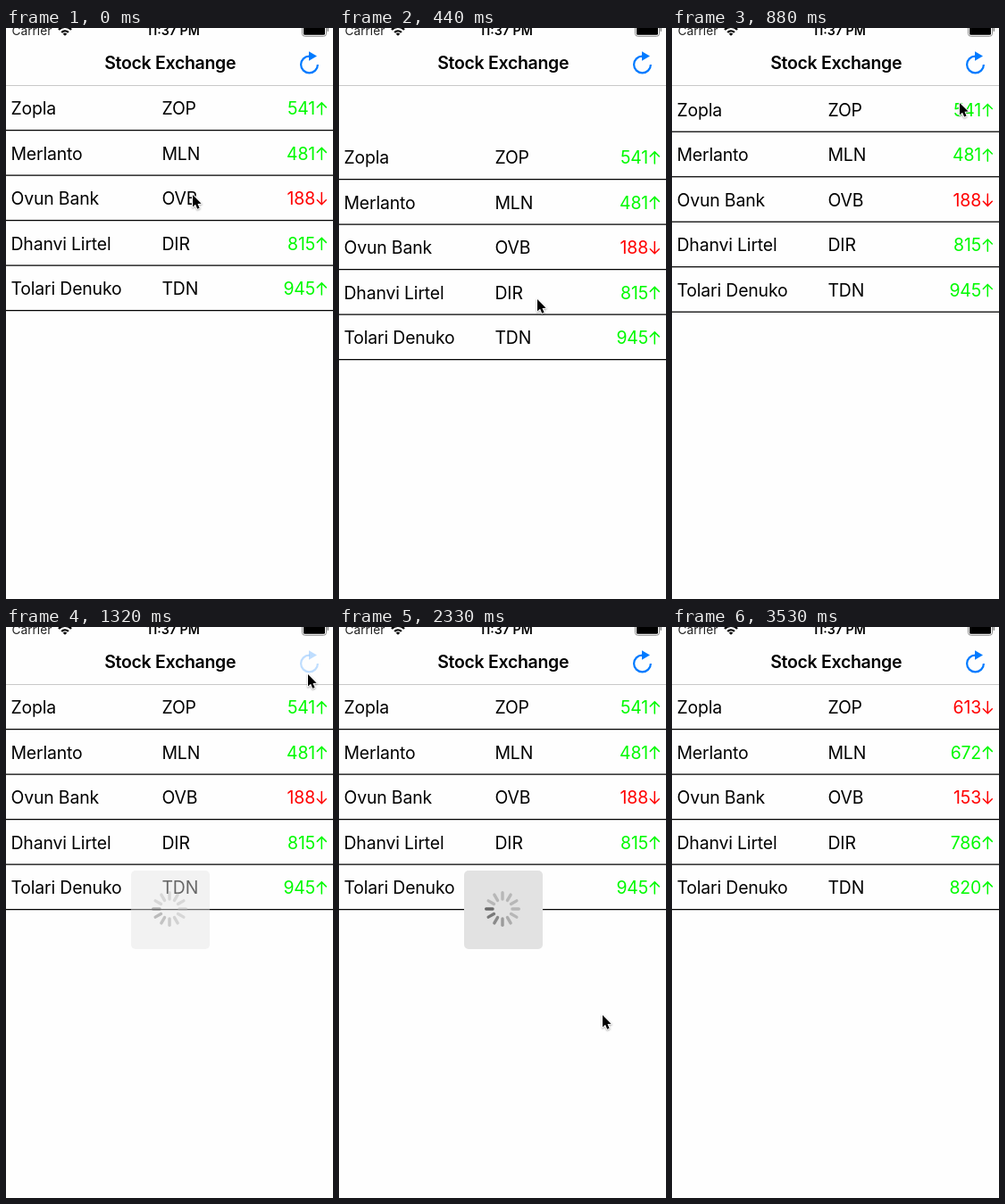
An HTML page with a canvas for the animation above (3.63 s loop, 366 by 640 pixels).

```html
<!DOCTYPE html>
<html lang="en">
<head>
<meta charset="utf-8">
<title>Stock Exchange</title>
<style>
  html, body { margin: 0; width: 100%; height: 100%; overflow: hidden; background: #fefefe; }
  canvas { display: block; width: 366px; height: 640px; }
</style>
</head>
<body>
<canvas id="stage" width="366" height="640"></canvas>
<script>
const ctx = document.getElementById('stage').getContext('2d');
const LOOP = 3630;
const PULL = 139, RELEASE = 433, TAP = 1300, RELOAD = 2480;
const GREEN = '#00fa00', RED = '#ff0000', BLUE = '#007aff';

// Negative values are falling prices.
const stocks = [
  { name: 'Zopla', code: 'ZOP', prices: [541, -613] },
  { name: 'Merlanto', code: 'MLN', prices: [481, 672] },
  { name: 'Ovun Bank', code: 'OVB', prices: [-188, -153] },
  { name: 'Dhanvi Lirtel', code: 'DIR', prices: [815, 786] },
  { name: 'Tolari Denuko', code: 'TDN', prices: [945, 820] }
];

// Pointer moves, each easing out with its own power.
const pointerStart = { x: 209, y: 187 };
const moves = [
  { from: 130, to: 330, x: 222, y: 304, power: 2 },
  { from: 433, to: 1168, x: 341, y: 42, power: 2 },
  { from: 1168, to: 1315, x: 338, y: 53, power: 1 },
  { from: 1580, to: 2180, x: 295, y: 435, power: 4 },
  { from: 2780, to: 3380, x: 331, y: 638, power: 1.5 },
  { from: 3380, to: 3530, x: 337, y: 662, power: 1 }
];

const clamp = v => Math.min(1, Math.max(0, v));

// The screen refreshes about seven times a second and catches up once midway.
function sampled(time) {
  const [origin, step] = time < 1580 ? [-8, 147] : [1580, 150];
  return origin + Math.floor((time - origin) / step) * step;
}

function pointerAt(time) {
  return moves.reduce((p, { from, to, x, y, power }) => {
    const k = 1 - (1 - clamp((time - from) / (to - from))) ** power;
    return { x: p.x + (x - p.x) * k, y: p.y + (y - p.y) * k };
  }, pointerStart);
}

function pullAt(time) {
  if (time < RELEASE) return 55 * clamp((time - PULL) / (RELEASE - PULL)) ** 0.8;
  const rest = 55 * Math.exp((RELEASE - time) / 125);
  return rest < 1 ? 0 : rest;
}

const loaderAlpha = time => Math.min(clamp((time - 1170) / 320), clamp((2545 - time) / 215));
const iconAlpha = time => time < TAP ? 1 : clamp((time - 1212) / 410);

function text(str, x, y, { size = 19.4, weight = 400, align = 'left', color = '#000', spacing = -0.15 } = {}) {
  ctx.font = `${weight} ${size}px Inter, sans-serif`;
  ctx.letterSpacing = spacing + 'px';
  ctx.textAlign = align;
  ctx.fillStyle = color;
  ctx.fillText(str, x, y);
}

function path(points, close) {
  ctx.beginPath();
  points.forEach(([x, y]) => ctx.lineTo(x, y));
  if (close) ctx.closePath();
}

function stroke(color, width, cap = 'butt') {
  ctx.strokeStyle = color;
  ctx.lineWidth = width;
  ctx.lineCap = cap;
  ctx.stroke();
}

function fill(color) {
  ctx.fillStyle = color;
  ctx.fill();
}

function box(x, y, w, h, r) {
  ctx.beginPath();
  ctx.roundRect(x, y, w, h, r);
}

function statusBar() {
  text('Carrier', 6.5, 7.7, { size: 13.7, spacing: 0, color: '#222' });
  text('11:37 PM', 187, 7.7, { size: 14.2, weight: 600, align: 'center', spacing: 0 });
  for (const r of [5.2, 9.6]) {
    ctx.beginPath();
    ctx.arc(66, 8.5, r, -Math.PI * 0.76, -Math.PI * 0.24);
    stroke('#000', 2.3);
  }
  ctx.beginPath();
  ctx.moveTo(66, 8.7);
  ctx.arc(66, 8.7, 3, -Math.PI * 0.76, -Math.PI * 0.24);
  fill('#000');
  box(331.5, -4, 27, 13.3, 3);
  stroke('#8a8a8a', 1);
  box(333, -2.5, 24, 10.2, 1.5);
  fill('#000');
  box(359.5, -1, 1.6, 5, 1);
  fill('#8a8a8a');
}

function refreshIcon(alpha) {
  ctx.globalAlpha = alpha;
  ctx.beginPath();
  ctx.arc(339.5, 41, 9.4, 0, Math.PI * 1.5);
  stroke(BLUE, 2.2);
  path([[339, 26.2], [348, 31.4], [339, 36.8]], true);
  fill(BLUE);
  ctx.globalAlpha = 1;
}

function priceArrow(y, up, color) {
  ctx.save();
  ctx.translate(353.3, y);
  if (!up) ctx.scale(1, -1);
  path([[0, 6.8], [0, -6]]);
  stroke(color, 1.5, 'round');
  path([[-5, -1.4], [0, -6.4], [5, -1.4]]);
  stroke(color, 1.5, 'round');
  ctx.restore();
}

function list(pull, reloaded) {
  stocks.forEach(({ name, code, prices }, i) => {
    const top = 64 + 50.5 * i + pull;
    const price = prices[+reloaded];
    const color = price > 0 ? GREEN : RED;
    text(name, 5.5, top + 33);
    text(code, 174.5, top + 33);
    text(Math.abs(price), 346, top + 33, { align: 'right', color });
    priceArrow(top + 26.3, price > 0, color);
    ctx.fillStyle = '#000';
    ctx.fillRect(0, top + 50, 366, 1.25);
  });
}

function loader(alpha, time) {
  ctx.save();
  ctx.globalAlpha = alpha;
  box(140, 273, 88, 88, 5);
  fill('#e2e2e2');
  ctx.translate(183, 316);
  const head = 9 + Math.round((time - 2330) * 12 / 1000);
  for (let i = 0; i < 12; i++) {
    const age = (((head - i) % 12) + 12) % 12;
    const shade = Math.min(183, 104 + age * 17);
    ctx.save();
    ctx.rotate(i * Math.PI / 6);
    path([[0, -11], [0, -18.3]]);
    stroke(`rgb(${shade},${shade},${shade})`, 3.4, 'round');
    ctx.restore();
  }
  ctx.restore();
}

function pointer({ x, y }) {
  ctx.save();
  ctx.translate(x, y);
  path([[0, 0], [0, 13.6], [3.1, 10.8], [5.2, 15.7], [7.6, 14.7], [5.5, 9.9], [9.6, 9.7]], true);
  ctx.lineJoin = 'round';
  ctx.shadowColor = 'rgba(0,0,0,0.35)';
  ctx.shadowBlur = 2;
  ctx.shadowOffsetY = 1;
  stroke('#fff', 2);
  ctx.shadowColor = 'transparent';
  fill('#000');
  ctx.restore();
}

function draw(time) {
  ctx.fillStyle = '#fefefe';
  ctx.fillRect(0, 0, 366, 640);
  list(pullAt(time), time >= RELOAD);
  statusBar();
  text('Stock Exchange', 183.7, 46.3, { size: 19.5, weight: 600, align: 'center', spacing: -0.3 });
  refreshIcon(iconAlpha(time));
  ctx.fillStyle = '#c8c8c8';
  ctx.fillRect(0, 64, 366, 1);
  loader(loaderAlpha(time), time);
  pointer(pointerAt(time));
}

const begin = performance.now();
function tick() {
  draw(sampled((performance.now() - begin) % LOOP));
  requestAnimationFrame(tick);
}
tick();
</script>
</body>
</html>
```
